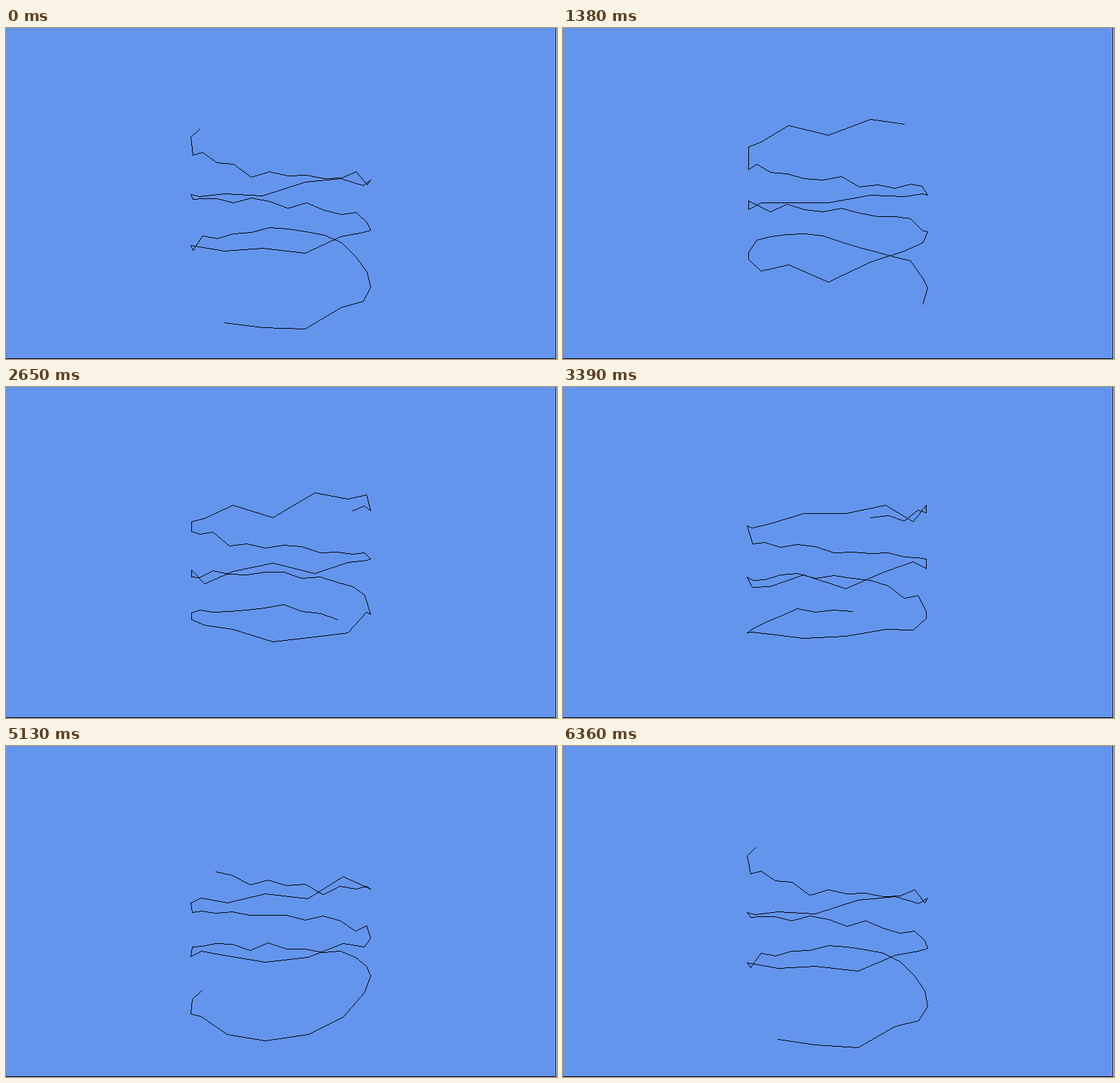
Write an HTML page with a canvas that moves like this. It is 800 px wide and 480 px high and loops after 6430 ms.

```html
<!DOCTYPE html>
<html lang="en">
<head>
<meta charset="utf-8">
<title>Turning spiral</title>
<style>
  html, body { margin: 0; width: 100%; height: 100%; overflow: hidden; background: #6495ed; }
  canvas { display: block; width: 800px; height: 480px; }
</style>
</head>
<body>
<canvas id="stage" width="800" height="480"></canvas>
<script>
const ctx = document.getElementById('stage').getContext('2d');

const LOOP = 6430;
const CENTER = { x: 398, y: 238 };
const RADIUS = 120;       // projected radius at the axis
const DEPTH = 0.4;        // radius relative to camera distance
const PER_TURN = 20;

// Height of each vertex along the spiral, top to bottom
const heights = [
  -65.6, -64.6, -50.1, -61, -50.6, -52.3, -29.7, -42, -33, -33.7,
  -26.2, -25.3, -31.7, -10.3, -14.5, -7, -13, -9.1, 3, 1.3,
  4.2, 2.4, 9, 9.7, 10.3, 19.4, 10.4, 18.2, 32.4, 20.8,
  33.5, 38.5, 31.5, 41.4, 45.2, 41.9, 41.5, 53.4, 48.9, 54.4,
  56, 62.1, 78.3, 65.9, 78.7, 76.2, 78.8, 70.9, 73.9, 77.2,
  79.7, 87.3, 100.9, 109.5, 113.8, 114.3, 108.2, 120.1, 118.3, 120.8
];

// [step, start time in ms]
const clock = [
  [0, 0], [1, 70], [10, 670], [11, 740], [13, 890], [14, 960], [20, 1380],
  [21, 1430], [28, 1920], [29, 1970], [30, 2040], [31, 2110], [40, 2720],
  [41, 2790], [50, 3390], [51, 3470], [60, 4070], [61, 4140], [62, 4210],
  [63, 4280], [70, 4740], [71, 4790], [76, 5130], [77, 5210], [80, 5400],
  [81, 5480], [90, 6070], [91, 6140], [94, 6360]
];

// [step, turn in degrees]
const turns = [
  [0, -43.6], [13, 5.8], [28, 62.4], [50, 147.4], [62, 192], [76, 245.8], [94, 314.6]
];

function lookup(table, at) {
  let k = 1;
  while (k < table.length - 1 && table[k][0] < at) k++;
  const [a, va] = table[k - 1];
  const [b, vb] = table[k];
  return va + (vb - va) * (at - a) / (b - a);
}

const starts = Array.from({ length: 95 }, (_, i) => Math.round(lookup(clock, i) / 10) * 10);

function stepAt(time) {
  let step = starts.length - 1;
  while (step > 0 && starts[step] > time) step--;
  return step;
}

function project(height, i, turn) {
  const angle = (turn - i * 360 / PER_TURN) * Math.PI / 180;
  const depth = 1 - DEPTH * Math.cos(angle);
  return [
    Math.round(CENTER.x + RADIUS * Math.sin(angle) / depth),
    Math.round(CENTER.y + height / depth)
  ];
}

// Hard-edged line, one pixel wide
function drawLine([x0, y0], [x1, y1]) {
  const n = Math.max(Math.abs(x1 - x0), Math.abs(y1 - y0), 1);
  for (let i = 0; i <= n; i++) {
    ctx.fillRect(Math.round(x0 + (x1 - x0) * i / n), Math.round(y0 + (y1 - y0) * i / n), 1, 1);
  }
}

function drawScene(step) {
  const turn = lookup(turns, step);
  ctx.fillStyle = '#6495ed';
  ctx.fillRect(0, 0, 800, 480);
  ctx.fillStyle = '#fff';
  ctx.fillRect(799, 0, 1, 480);
  ctx.fillStyle = '#000';
  ctx.fillRect(798, 0, 1, 480);
  ctx.fillRect(0, 479, 799, 1);
  const points = heights.map((h, i) => project(h, i, turn));
  for (let i = 1; i < points.length; i++) drawLine(points[i - 1], points[i]);
}

const begin = performance.now();
let shown = -1;

function tick() {
  const step = stepAt((performance.now() - begin) % LOOP);
  if (step !== shown) {
    drawScene(step);
    shown = step;
  }
  requestAnimationFrame(tick);
}
tick();
</script>
</body>
</html>
```
